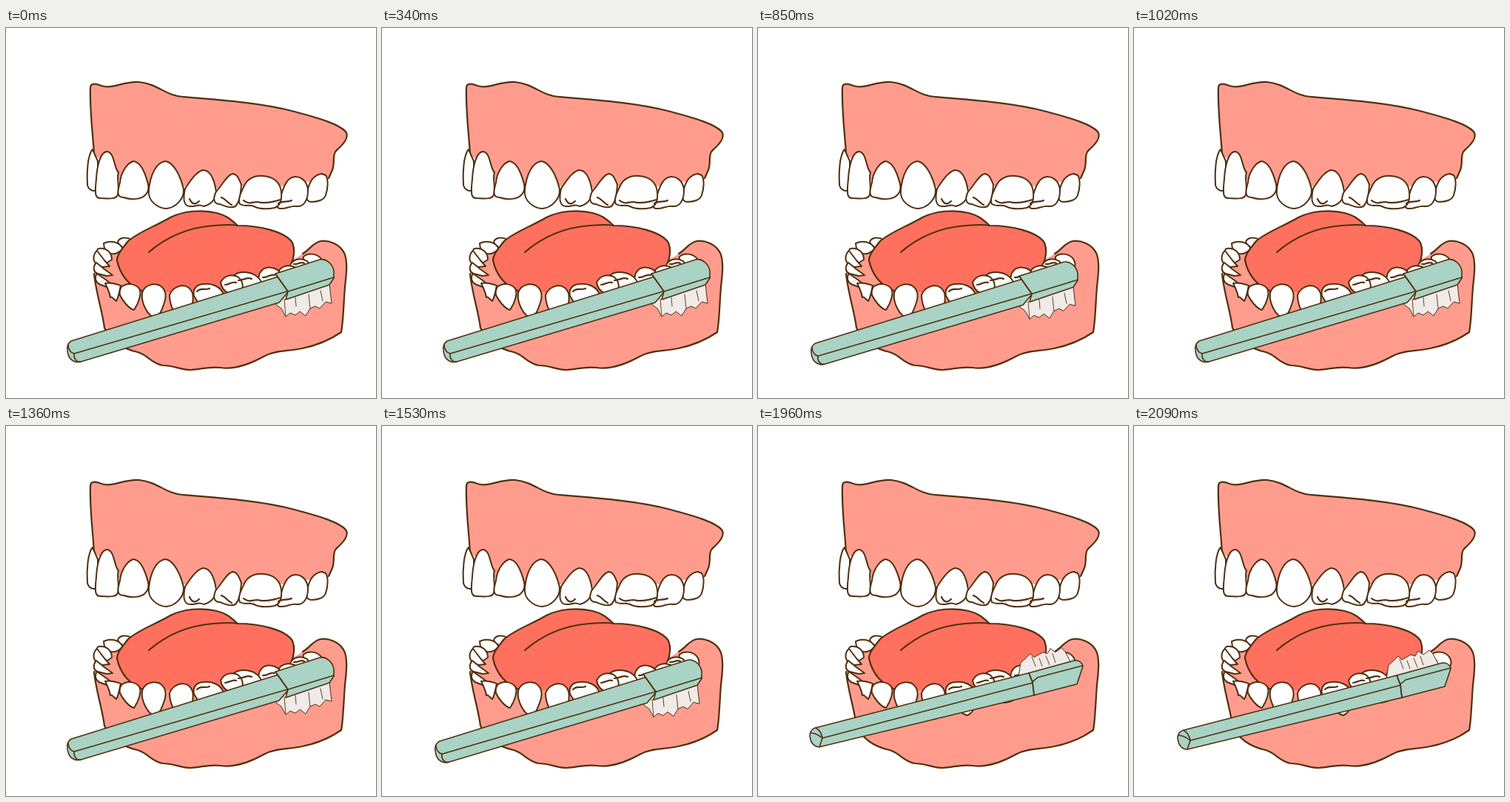
Animation of 500x500 px, one loop 2220 ms. Source, as an HTML page:

```html
<!DOCTYPE html>
<html lang="en">
<head>
<meta charset="utf-8">
<title>Brushing the lower teeth</title>
<style>
html, body { margin: 0; width: 100%; height: 100%; overflow: hidden; background: #fff; }
svg { display: block; width: 100%; height: 100%; }
path { stroke: #50300f; stroke-width: 2.2; stroke-linejoin: round; stroke-linecap: round; }
.gum { fill: #ff9c8d; }
.tongue { fill: #ff705f; }
.flat { stroke: none; }
.tooth { fill: #fff; stroke-width: 2; }
.line { fill: none; }
.mint { fill: #a9d3c5; }
.brush path { stroke-width: 1.6; }
.brush .bristle { fill: #f0eae8; stroke-width: 1; }
.brush .hair { fill: none; stroke-width: .9; }
</style>
</head>
<body>
<svg id="stage" viewBox="0 0 500 500"></svg>
<script>
const stage = document.getElementById('stage');
const NS = 'http://www.w3.org/2000/svg';

function add(parent, tag, attrs = {}) {
  const el = document.createElementNS(NS, tag);
  for (const key in attrs) el.setAttribute(key, attrs[key]);
  return parent.appendChild(el);
}
function draw(parent, cls, ...paths) {
  for (const d of paths) add(parent, 'path', { class: cls, d });
}
// A filled shape outlined only along its open edge; the rest hides behind teeth
function drawOpen(parent, cls, edge, rest) {
  draw(parent, cls + ' flat', edge + rest + 'Z');
  draw(parent, 'line', edge);
}

// Upper jaw
const upper = add(stage, 'g');
drawOpen(upper, 'gum', `M119 170C117 140 113 110 114 81C114 74 121 75 129 78C143 83 158 72 180 73
  C206 76 215 91 239 93C300 98 350 102 390 113C424 122 450 130 459 140C464 147 456 157 448 164
  C440 170 445 181 441 192L436 203`,
  'L432 205L408 208L371 214L318 214L284 217L241 214L193 212L153 205');
draw(upper, 'tooth',
  'M117 164C110 172 109 196 110 212C112 220 118 221 124 219L124 180Z',
  'M136 167C128 168 123 185 122 204C120 222 120 230 127 230C141 231 150 231 151 225C154 213 149 203 152 195C146 191 147 167 136 167Z',
  'M172 180C163 183 155 196 154 209C150 222 150 229 159 229C171 233 183 231 188 226C193 221 193 215 192 211C188 195 182 181 172 180Z',
  'M215 180C203 182 195 198 193 219C191 234 206 244 217 244C228 243 241 232 240 218C236 201 227 181 215 180Z',
  'M266 192C256 195 249 207 242 217C239 231 240 240 248 241C256 242 260 237 267 241C275 239 284 233 284 221C282 208 277 192 266 192Z',
  'M306 197C298 199 292 213 284 221C279 231 281 238 289 238C297 241 304 244 310 241C317 233 317 222 318 212C315 204 312 197 306 197Z',
  'M427 197C418 198 412 205 409 214C405 229 405 235 413 235C422 235 430 232 432 226C435 217 436 205 432 199Z',
  'M391 201C381 201 376 212 372 225C366 234 363 242 370 244C379 245 386 239 393 241C402 242 408 233 408 220C408 211 402 201 391 201Z',
  'M348 200C335 199 327 203 322 213C317 223 313 232 316 238C322 242 328 238 335 241C343 245 353 245 363 243C371 240 373 232 372 222C371 210 363 201 348 200Z');
draw(upper, 'line',
  'M248 231C252 240 257 238 261 234', 'M291 229C297 231 300 237 305 239',
  'M321 233C328 239 333 235 340 235C350 238 361 235 371 232', 'M368 237C374 233 380 236 386 233');

// Lower jaw
const lower = add(stage, 'g');
drawOpen(lower, 'gum', `M119 332C121 355 130 382 133 405C142 425 160 434 178 438C192 442 196 453 212 456
  C228 456 235 462 250 462C265 461 275 457 290 459C310 462 330 454 350 443C362 436 380 437 400 433
  C425 428 440 420 453 411C456 395 456 375 458 350C461 325 461 315 458 306C452 292 436 286 425 288
  C415 290 411 299 401 305`,
  'L390 312L345 300L170 290L140 292');
draw(lower, 'tooth',
  'M170 286C160 281 153 284 151 289C153 294 156 297 162 297Z',
  'M158 298C152 288 141 287 132 291C132 297 135 303 142 305C148 306 153 304 158 298Z',
  'M143 313C143 303 135 296 125 298C120 302 122 309 128 311L135 318Z',
  'M140 322L133 314L123 301C118 305 117 313 121 318L130 323Z',
  'M144 334L133 326L122 317C117 323 118 330 124 332L136 335Z',
  'M146 349L136 341L123 332C119 338 121 344 128 347L139 351Z');
drawOpen(lower, 'tongue', `M185 356C166 348 154 333 150 314C150 306 158 297 165 288C180 275 202 268 222 256
  C240 247 265 245 285 250C300 254 305 260 313 267C343 267 377 275 387 290C391 300 389 311 385 320`,
  'L345 345L300 360');
draw(lower, 'line', 'M193 303C215 284 242 270 280 267C294 266 304 265 313 267');
draw(lower, 'tooth',
  'M134 345C141 343 149 346 155 348C153 358 152 364 149 369C145 366 143 362 141 364C140 357 137 351 134 345Z',
  'M156 350C163 344 174 345 180 352C184 359 179 372 173 381C165 379 157 367 154 361C153 356 154 353 156 350Z',
  'M402 309C408 303 421 305 426 312C431 320 428 327 421 330C410 332 400 322 402 309Z',
  'M384 321C387 312 399 310 407 315C414 323 409 335 400 338C389 338 383 331 384 321Z',
  'M367 333C369 322 381 319 390 323C399 331 395 343 386 347C374 347 368 341 367 333Z',
  'M341 340C342 325 352 321 363 325C371 328 375 336 373 346C369 357 359 360 351 358C344 355 340 348 341 340Z',
  'M308 334C315 328 330 329 338 335C347 341 352 356 346 370C335 376 316 375 307 366C300 354 302 342 308 334Z',
  'M290 344C294 335 304 332 313 336C320 341 322 350 317 358C307 363 293 359 290 344Z',
  'M254 362C252 352 258 346 268 346C278 345 289 349 293 358C298 372 292 387 283 391C275 390 261 375 254 362Z',
  'M221 361C225 350 238 345 247 351C256 358 253 373 248 384C246 391 243 396 238 396C229 393 221 374 221 361Z',
  'M184 358C187 347 200 344 208 348C217 354 217 362 214 371C211 380 208 389 201 391C192 390 182 371 184 358Z');
draw(lower, 'line',
  'M258 356C264 350 269 355 275 352', 'M296 347C302 347 306 342 311 344',
  'M314 341C321 341 326 336 332 339', 'M347 337C353 338 357 332 363 334', 'M389 319C395 320 398 315 403 318');

// Brush with the bristles facing down
const downBrush = add(stage, 'g', { class: 'brush' });
draw(downBrush, 'bristle', `M366 362L365 374L372 379L378 390L384 385L391 388L397 383L405 389L411 379L418 376
  L424 379L432 370L440 372L437 346Z`);
draw(downBrush, 'hair', 'M376 366L378 390', 'M391 364L392 376', 'M409 360L411 379', 'M425 355L428 369');
draw(downBrush, 'mint', 'M88 423L368 336L385 350L381 357L369 371L101 451C94 453 86 449 84 441C82 433 82 427 88 423Z');
draw(downBrush, 'line', 'M101 451C95 452 91 446 92 440L380 356', 'M84 428C84 435 88 439 92 440');
draw(downBrush, 'mint', 'M364 332L424 313C433 311 441 319 443 328L443 338L437 347L378 367L381 356Z');
draw(downBrush, 'line', 'M364 332L381 356L443 337');

// Brush with the bristles facing up
const upBrush = add(stage, 'g', { class: 'brush' });
draw(upBrush, 'bristle', `M341 342L344 323L350 318L357 311L362 316L369 312L374 309L380 311L384 304L391 309
  L399 303L404 308L412 323Z`);
draw(upBrush, 'hair', 'M359 315L364 328', 'M369 317L373 328', 'M378 314L383 326', 'M387 311L391 323');
draw(upBrush, 'mint', 'M67 411L355 337L367 344L362 367L72 437C64 437 59 430 59 420C60 415 63 412 67 411Z');
draw(upBrush, 'line', 'M361 350L76 425L72 437', 'M67 411C72 414 75 419 76 425', 'M60 418C66 418 70 420 76 425');
draw(upBrush, 'mint', 'M355 337L417 320C423 320 427 323 428 328L420 352L362 367L360 350Z');
draw(upBrush, 'line', 'M355 337L360 349L367 343L428 327', 'M360 349L362 367');

const LOOP = 2220, SCRUB_END = 1700;
const STROKE = [-11, 3.3];

function place(brush, x, y) {
  brush.setAttribute('transform', `translate(${x} ${y})`);
}

function render(ms) {
  const t = ms % LOOP;
  const late = t >= SCRUB_END;
  const step = late ? Math.floor((t - SCRUB_END) / 130) : Math.floor(t / 170);
  const pulled = step % 2;
  const inside = late && step >= 2;
  downBrush.style.display = inside ? 'none' : '';
  upBrush.style.display = inside ? '' : 'none';
  const [dx, dy] = STROKE;
  if (inside) place(upBrush, (pulled - 1) * dx, (pulled - 1) * dy);
  else place(downBrush, (late ? -20 : 0) + pulled * dx, (late ? -14 : 0) + pulled * dy);
}

function tick() {
  render(performance.now());
  requestAnimationFrame(tick);
}
tick();
</script>
</body>
</html>
```
